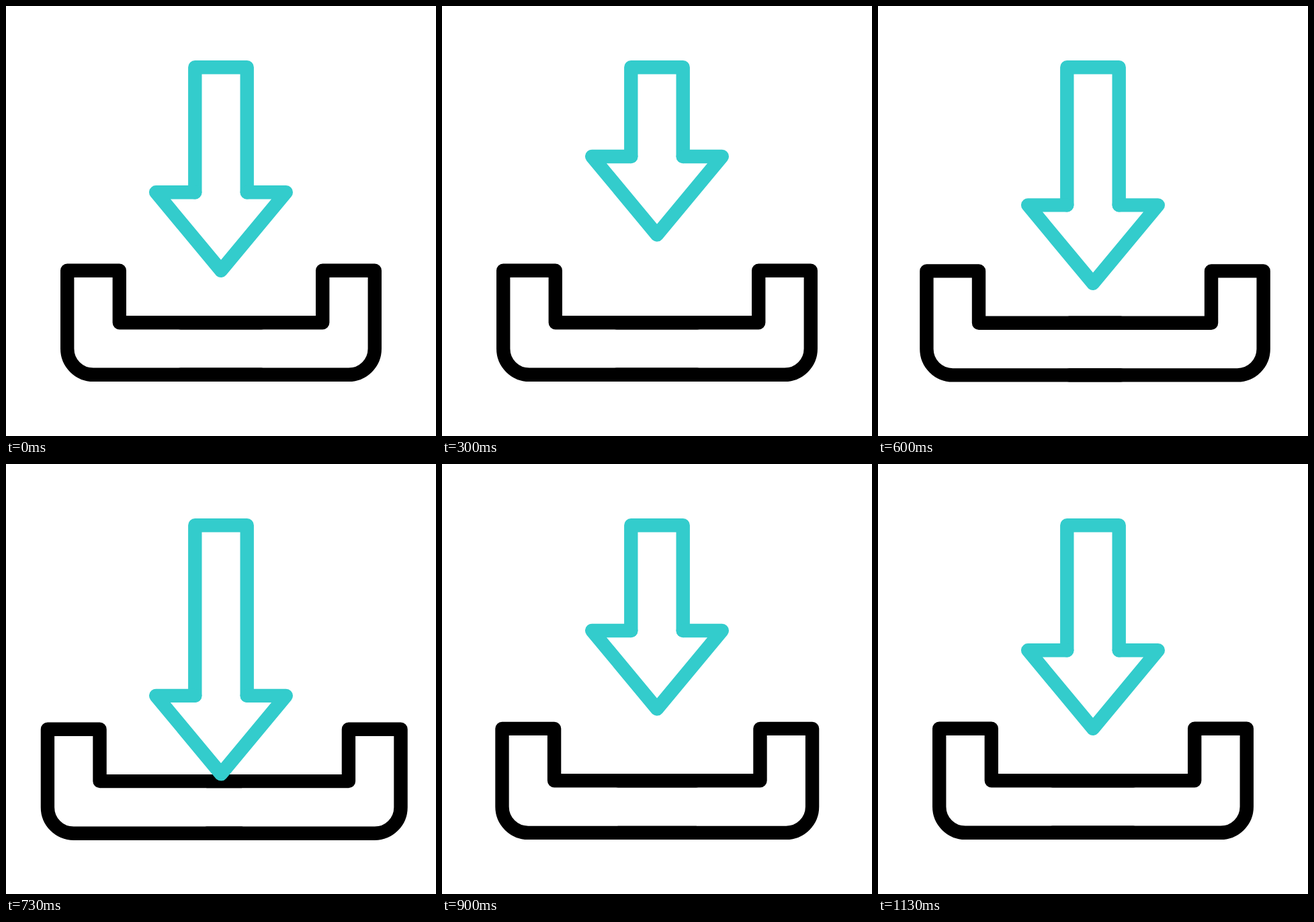
An HTML page without scripts that plays this animation: 640 px wide and 640 px high, repeating every 1.5 s.

```html
<!DOCTYPE html>
<html lang="en">
<head>
<meta charset="utf-8">
<title>Download tray</title>
<style>
  @property --k { syntax: "<number>"; inherits: true; initial-value: 0; }

  html, body { margin: 0; height: 100%; overflow: hidden; background: #fff; }

  svg {
    display: block;
    width: 100vw;
    height: 100vh;
    animation: clock 1.5s -4ms infinite;

    /* progress of each seven-tick phase */
    --p1: clamp(0, var(--k) / 7, 1);
    --p2: clamp(0, (var(--k) - 7) / 7, 1);
    --p3: clamp(0, (var(--k) - 14) / 7, 1);
    --p4: clamp(0, (var(--k) - 21) / 7, 1);
    --p5: clamp(0, (var(--k) - 28) / 7, 1);

    /* the same, eased in and out */
    --s1: (var(--p1) * var(--p1) * (3 - 2 * var(--p1)));
    --s2: (var(--p2) * var(--p2) * (3 - 2 * var(--p2)));
    --s3: (var(--p3) * var(--p3) * (3 - 2 * var(--p3)));
    --s4: (var(--p4) * var(--p4) * (3 - 2 * var(--p4)));
    --s5: (var(--p5) * var(--p5) * (3 - 2 * var(--p5)));

    --drop: (-50.5 * var(--s1) - 14.5 * var(--s2) + 138.6 * var(--s3) - 109 * var(--s4) + 35.4 * var(--s5));
    --widen: (var(--s3) - var(--s4));
  }

  /* 30 ticks per second, then rest */
  @keyframes clock {
    0% { --k: 0; animation-timing-function: steps(34); }
    75.55% { --k: 34; animation-timing-function: step-start; }
    75.56%, 100% { --k: 35; }
  }

  path {
    fill: none;
    stroke-width: 20.4px;
    stroke-linecap: round;
    stroke-linejoin: round;
  }
  .tray { stroke: #000; }
  .arrow { stroke: #33cccc; }

  .left { transform: translate(calc(-31px * var(--widen)), calc(1px * var(--widen))); }
  .right { transform: translate(calc(41px * var(--widen)), calc(1px * var(--widen))); }
  .head { transform: translateY(calc(1px * var(--drop))); }
  .shaft {
    vector-effect: non-scaling-stroke;
    transform-origin: 0 91.2px;
    transform: scaleY(calc(1 + var(--drop) / 186.1));
  }
</style>
</head>
<body>
<svg viewBox="0 0 640 640">
  <g class="tray">
    <path class="left" d="M380 471.2H168.8V393.8H91.2V510A38.8 38.8 0 0 0 130 548.8H380"/>
    <path class="right" d="M260 471.2H471.2V393.8H548.8V510A38.8 38.8 0 0 1 510 548.8H260"/>
  </g>
  <g class="arrow">
    <path class="shaft" d="M281.3 277.3V91.2H358.7V277.3"/>
    <path class="head" d="M358.7 277.3H416.8L320 393.8L223.2 277.3H281.3"/>
  </g>
</svg>
</body>
</html>
```
